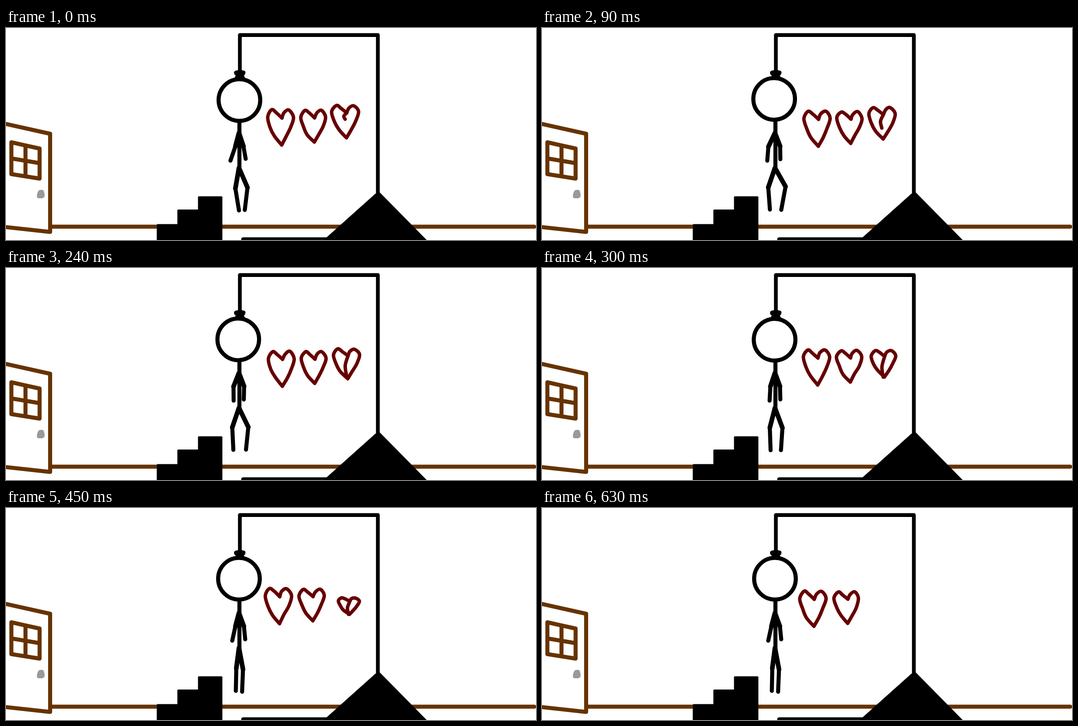
Recreate the animation shown at these times as an HTML page. Size 1183x473 px, loop 0.9 s.

```html
<!DOCTYPE html>
<html lang="en">
<head>
<meta charset="utf-8">
<title>Hangman</title>
<style>
  html, body { margin: 0; width: 100%; height: 100%; overflow: hidden; background: #fff; }
  svg { display: block; width: 100%; height: 100%; }
  .line { fill: none; stroke-width: 9; stroke-linecap: round; stroke-linejoin: round; }
  .ink { stroke: #000; }
  .wood { stroke: #663300; }
  .frame { stroke-width: 8.4; }
  .upper { stroke-width: 10.4; }
  .heart { stroke: #660000; stroke-width: 7.7; }
</style>
</head>
<body>
<svg viewBox="0 0 1183 473">
  <path class="line wood" d="M103 443.3H1179"/>
  <path class="line wood" d="M-6 212.7L98.5 236V455L-6 443.5"/>
  <path class="line wood" d="M12 255L75 269V336L12 326ZM43.5 262V331M12 291L75 301.500"/>
  <path fill="#999" d="M74 362Q79 360 83.500 362Q87 370 86 376Q84 380 79 380H72Q68 378 69 373Q71 363 74 362Z"/>

  <path d="M336.500 473V439.500Q336.500 437.500 338.500 437.500H382.500V407Q382.500 405 384.500 405H428.500V377.500Q428.500 375.500 430.500 375.500H481Q483 375.500 483 377.500V473Z"/>
  <path class="line" stroke="#080b0d" d="M529.500 471.500H730"/>
  <path d="M709 473L827.500 367Q830 362.500 833.500 366L939 473Z"/>
  <path class="line ink frame" d="M522 104V15.800H830V372"/>
  <path d="M513 95Q522 93 531 95Q535 96 534.500 100Q534 104 531 106Q532 108 534 112H510Q511 108 513 106Q509 104 509 100Q509 96 513 95Z"/>

  <path class="line ink" d="M521 207V312"/>
  <path class="line ink upper" id="upper"/>
  <path class="line ink" id="lower"/>
  <circle class="line ink" id="head" r="46.500" style="fill:#fff"/>
  <path class="line heart" id="hearts"/>
</svg>
<script>
const LOOP = 900, STEP = 30, SWING = 450, REDRAW = 90, LAST_REDRAW = 7;
const part = id => document.getElementById(id);

// A joint drifts from one place to another and is kicked aside, most at its peak time.
function joint({ from, to, kick, peak }, time) {
  const u = Math.min(time / SWING, 1);
  const warp = Math.log(0.5) / Math.log(peak / SWING);
  const bump = Math.sin(Math.PI * u ** warp) ** 2;
  return from.map((v, i) => v + (to[i] - v) * u + kick[i] * bump);
}

const shoulder = [520, 234], hip = [520, 312];
const limbs = [
  { root: shoulder,
    bend: { from: [512, 264], to: [512, 264], kick: [-7, 1], peak: 120 },
    end: { from: [501, 296], to: [505, 296], kick: [5, 0], peak: 250 } },
  { root: shoulder,
    bend: { from: [530, 264], to: [531, 264], kick: [1.5, 0], peak: 130 },
    end: { from: [535, 292], to: [534, 293], kick: [-4.3, 1], peak: 180 } },
  { root: hip,
    bend: { from: [512, 358], to: [514, 358], kick: [-10, -3], peak: 165 },
    end: { from: [520, 407], to: [513, 408], kick: [-12, -2.5], peak: 150 } },
  { root: hip,
    bend: { from: [539, 356], to: [529, 360], kick: [9, -4], peak: 165 },
    end: { from: [533, 406], to: [527, 410], kick: [6, -3], peak: 220 } }
];
const headSway = { from: [521], to: [520], kick: [-3], peak: 140 };

function drawFigure(time) {
  let upper = "", lower = "";
  for (const { root, bend, end } of limbs) {
    const knee = joint(bend, time);
    upper += `M${root}L${knee}`;
    lower += `M${knee}L${joint(end, time)}`;
  }
  part("upper").setAttribute("d", upper);
  part("lower").setAttribute("d", lower);

  const t = Math.min(time, SWING);
  const bob = 2 * Math.cos(2 * Math.PI * t / 300) * (1 - t / LOOP);
  part("head").setAttribute("cx", joint(headSway, time)[0]);
  part("head").setAttribute("cy", 158.7 + bob);
}

// Smooth curve through points.
function curve(pts) {
  const at = i => pts[Math.max(0, Math.min(pts.length - 1, i))];
  const handle = (i, sign) =>
    at(i).map((v, k) => v + sign * (at(i + 1)[k] - at(i - 1)[k]) / 6);
  return "M" + pts[0] + pts.slice(1).map((p, i) =>
    `C${handle(i, 1)} ${handle(i + 1, -1)} ${p}`).join("");
}

// Seeded wobble of the drawing hand, from -1 to 1.
function wobbler(seed) {
  return () => {
    seed = (seed * 16807) % 2147483647;
    return seed / 1073741823.5 - 1;
  };
}

const dip = [0.06, -0.27], tip = [0.05, 0.5];
const lobe = [[0.14, -0.42], [0.33, -0.5], [0.5, -0.3], [0.4, 0], [0.23, 0.25]];

function heart(x, y, w, h, seed, crack = 0) {
  const wobble = wobbler(seed);
  const place = ([px, py]) => [x + px * w, y + py * h];
  const shake = p => place(p).map(v => v + wobble());
  const half = side =>
    curve([place(dip), ...lobe.map(([px, py]) => shake([side * px, py])), place(tip)]);
  let d = half(-1) + half(1);
  if (crack) {
    const depth = dip[1] + (tip[1] - dip[1]) * crack;
    d += curve([dip, [-0.05, (dip[1] + depth) / 2], [0, depth]].map(place));
  }
  return d;
}

// The hearts are drawn anew at each redraw; the third breaks, shrinks and goes.
function drawHearts(time) {
  const n = Math.min(Math.floor(time / REDRAW), LAST_REDRAW);
  const sway = Math.cos((n - 1.5) * Math.PI / 6);
  const lift = 3.3 * Math.sin(n * Math.PI / 3);
  const shrink = n * n;
  let d = heart(609 + 5 * sway, 222 + lift, 58, 78, 11 + n)
        + heart(683 + 3.5 * sway, 219.5 + lift, 55, 70, 31 + n);
  if (n < LAST_REDRAW) {
    d += heart(757 + 1.5 * n, 209 + lift + 0.5 * shrink,
               59 - 0.5 * shrink, 72 - 1.4 * shrink, 51 + n,
               Math.min(1, 0.25 + 0.3 * n));
  }
  part("hearts").setAttribute("d", d);
}

function render(now) {
  const time = Math.floor((now % LOOP) / STEP) * STEP;
  drawFigure(time);
  drawHearts(time);
}

const start = performance.now();
function tick() {
  render(performance.now() - start);
  requestAnimationFrame(tick);
}
tick();
</script>
</body>
</html>
```
